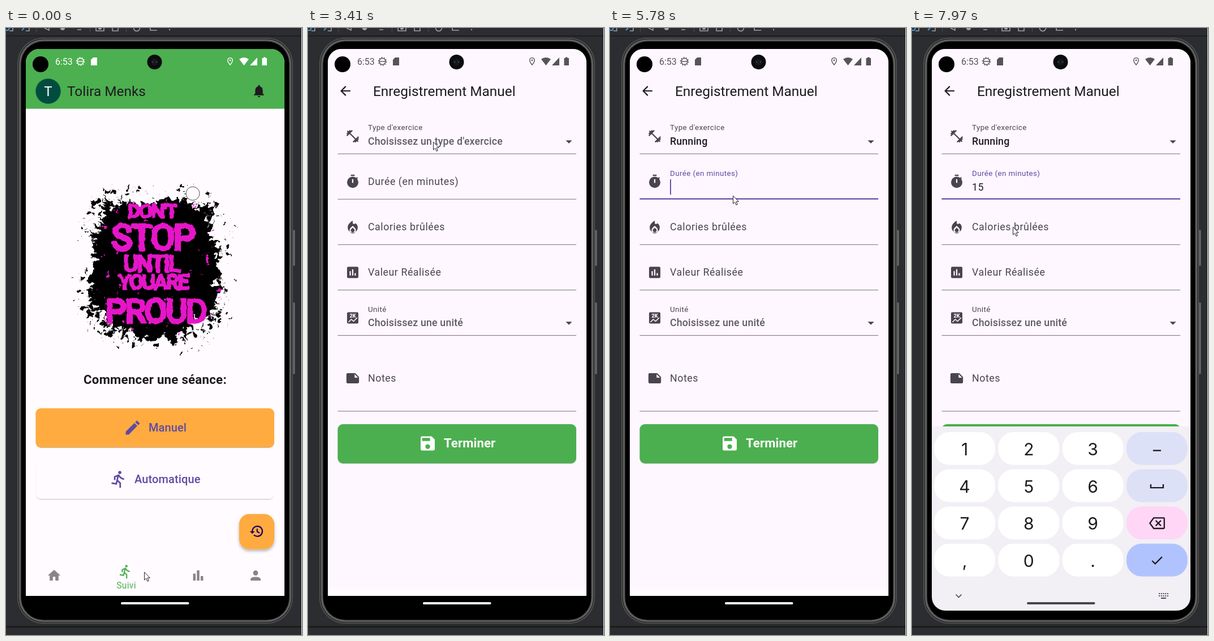
Write an HTML page that moves like this. It is 523 px wide and 1071 px high and loops after 8000 ms.

```html
<!DOCTYPE html>
<html lang="fr">
<head>
<meta charset="utf-8">
<title>Suivi</title>
<style>
  html, body { margin: 0; width: 100%; height: 100%; overflow: hidden; background: #2b2d30; }
  svg { display: block; }
  text { font-family: Roboto, sans-serif; white-space: pre; }
  .key { font-family: Inter, sans-serif; }
  .mid { text-anchor: middle; }
</style>
</head>
<body>
<svg id="stage" width="523" height="1071" viewBox="0 0 523 1071"></svg>
<script>
const LOOP = 8000;
const INK = '#1d1b20', GREY = '#49454f', HINT = '#5f5b63', PURPLE = '#5f4ba3', GREEN = '#4caf50', ORANGE = '#ffab40';
const LINE = '#827e86', PAGE = '#fef7ff', WHITE = '#fffbfe', MAGENTA = '#e616c8', NAV = '#878588';

const ring = (x, y, r) => `M${x - r} ${y}a${r} ${r} 0 1 0 ${2 * r} 0a${r} ${r} 0 1 0 ${-2 * r} 0z`;
const card = 'M3 5q0-2 2-2h14q2 0 2 2v14q0 2-2 2H5q-2 0-2-2z';

// Filled part and stroked part of each icon, on a 24 unit grid.
const ICONS = {
  edit: ['M3 17.2V21h3.800L17.800 9.900l-3.700-3.700zM15.100 5.100l3.800 3.800L21 6.700 17.300 3z'],
  run: [ring(13.5, 3.5, 2), 'M7 13V9l5-2q3 4.900 7 4.900M11.500 7.500 9 18l-6-1M10.500 13.800 14 17v6'],
  home: ['M10 20v-6h4v6h5v-8h3L12 3 2 12h3v8z'],
  bars: ['M4 9h4v11H4zM10 4h4v16h-4zM16 13h4v7h-4z'],
  person: [ring(12, 8, 4) + 'M4 20v-2c0-5 16-5 16 0v2z'],
  bell: ['M10 20h4a2 2 0 0 1-4 0M4 19v-1l2-2v-5q0-5 4.500-6.300V4a1.500 1.500 0 0 1 3 0v.7Q18 6 18 11v5l2 2v1z'],
  history: ['M1 12h8l-4 4z', 'M5 12a8 8 0 1 1 2.400 5.700M12.700 8v4.500l4 2.300'],
  back: ['', 'M20 12H5.500M12.700 4.700 5.400 12l7.300 7.300'],
  drop: ['M7 10l5 5 5-5z'],
  weights: ['', 'M3.400 3.400l17.200 17.200M2.700 11.300l8.600-8.600M2.700 8.400l5.700-5.700M12.700 21.300l8.600-8.600M15.600 21.300l5.700-5.700'],
  timer: ['M9 1h6v2H9z' + ring(12, 13, 9) + 'M11 8h2v6h-2z', 'M17 8l2.500-2.500'],
  fire: ['M12 2S4 6 4 13a8 8 0 0 0 16 0q0-5-4-7c-1 2-4 1.500-4-.7zM12 10.100l-3.500 3.400a5 5 0 1 0 7 0zM12 13l-2 2a3 3 0 1 0 4 0z'],
  chart: [card + 'M7 10h2v7H7zM11 7h2v10h-2zM15 13h2v4h-2z'],
  unit: [card],
  note: ['M22 10l-6-6H4q-2 0-2 2v12q0 2 2 2h16q2 0 2-2zM15 5.500l5.500 5.500H15z'],
  save: ['M17 3H5q-2 0-2 2v14q0 2 2 2h14q2 0 2-2V7zM5 5h10v4H5z' + ring(12, 16, 3)],
  pin: [ring(12, 9, 2), 'M12 20.500C10 18 6 13 6 9a6 6 0 0 1 12 0c0 4-4 9-6 11.500z'],
  erase: ['', 'M7 4h15q1 0 1 1v14q0 1-1 1H7L1.200 12zM10 8l8 8M18 8l-8 8'],
  check: ['', 'M4 12.700l5 4.900L20.300 6.300']
};

const icon = (name, cx, cy, size = 26.7, color = GREY) => {
  const [solid, lines = ''] = ICONS[name];
  return `<g transform="translate(${cx - size / 2} ${cy - size / 2}) scale(${size / 24})">
    <path fill="${color}" fill-rule="evenodd" d="${solid}"/>${stroke(lines, color, 2)}</g>`;
};
const text = (x, y, size, str, fill = INK, extra = '') =>
  `<text x="${x}" y="${y}" font-size="${size}" fill="${fill}" ${extra}>${str}</text>`;
const rect = (x, y, w, h, fill, r = 0, extra = '') =>
  `<rect x="${x}" y="${y}" width="${w}" height="${h}" rx="${r}" fill="${fill}" ${extra}/>`;
const circle = (x, y, r, fill, extra = '') => `<circle cx="${x}" cy="${y}" r="${r}" fill="${fill}" ${extra}/>`;
const stroke = (d, color, width = 1, extra = '') =>
  `<path d="${d}" fill="none" stroke="${color}" stroke-width="${width}" ${extra}/>`;
const spaced = (em, weight = 400) => `letter-spacing="${em}" font-weight="${weight}"`;
const button = (y, fill) => rect(52.5, y, 421.5, 69, fill, 9, 'filter="url(#low)"');

function frame() {
  const tools = '#9da0a6';
  const shell = (inset, fill) => rect(20 + inset, 17 + inset, 487 - 2 * inset, 1034 - 2 * inset, fill, 46 - inset);
  const sideKey = (y, h) => rect(504, y, 7, h, '#4a4b4d', 2) + rect(508, y + 1, 1.5, h - 2, '#77787a');
  return rect(0, 0, 523, 1071, '#2b2d30') + rect(0, 13, 523, 2, '#1e1f22')
    + stroke('M0 4h4l2-4M28 4l4-4', '#3f9be0', 2)
    + stroke('M12 0v5H6M41 0v5h-6M76 0v4l-8-4M126 3h7M159 0v5h14V0M188 0v5h10V0M255 0v4h12', tools, 1.6)
    + circle(100, 0, 4, tools) + circle(166, 0, 3, tools) + circle(231, 0, 5.5, 'none', `stroke="${tools}" stroke-width="1.6"`)
    + circle(289, 3, 1.2, tools) + [53, 148, 212].map(x => rect(x, 0, 1, 7, '#4b4e53')).join('')
    + rect(0, 1055, 523, 3, '#1b1c1e')
    + sideKey(356, 64) + sideKey(484, 127)
    + ['#505050', '#2c2c2c', '#707070', '#484848', '#000'].map((c, i) => shell(i * 1.7, c)).join('')
    + rect(522, 0, 1, 1071, '#eee');
}

function status() {
  return `<g id="status">${text(87, 65, 16, '6:53', 'currentColor')}
    ${circle(131.5, 59, 5.5, 'none', 'stroke="currentColor" stroke-width="1.400"')}
    ${circle(131.5, 59, 7, 'none', 'stroke="currentColor" stroke-width="1.500" stroke-dasharray="2 2.400"')}
    ${stroke('M126 59h11', 'currentColor', 1.4)}
    <path fill="currentColor" d="M154 52h7v14h-11V56zM412 55q8.500-6 17 0l-8.500 11zM431 66l13-14v14zM452.500 53h2.500v-1.500h3.500V53h2.500v13h-8.500z"/>
    ${icon('pin', 396, 59, 17, 'currentColor')}</g>`;
}

function poster() {
  let seed = 11;
  const rnd = () => (seed = (seed * 16807) % 2147483647) / 2147483647;
  const around = (angle, k) => {
    const bend = v => Math.sign(v) * Math.abs(v) ** .65;
    return [264 + 122 * k * bend(Math.cos(angle)), 421 + 130 * k * bend(Math.sin(angle))];
  };
  const blot = Array.from({ length: 180 }, (_, i) => {
    const a = i / 180 * Math.PI * 2;
    return around(a, .93 + .05 * Math.sin(5 * a) + .05 * Math.sin(9 * a + 2) + .16 * (rnd() - .5)).map(Math.round);
  });
  const dots = (count, from, to, size) => Array.from({ length: count }, () => {
    const [x, y] = around(rnd() * Math.PI * 2, from + rnd() * (to - from));
    return ring(x, y, .4 + size * rnd() ** 4);
  }).join('');
  const word = (str, x, y, size) => text(x, y, size, str, MAGENTA, 'letter-spacing="-.06em" word-spacing="-.2em"');
  return `<g filter="url(#torn)">
    <path d="M${blot.join('L')}z${dots(200, .9, 1.12, 6)}${dots(90, 1, 1.2, 1.5)}"/>
    <path fill="${WHITE}" d="${dots(130, .84, 1.02, 5)}"/>
    <path fill="${MAGENTA}" d="${dots(150, .4, 1, 2.6)}"/></g>
    ${circle(330, 292, 12, WHITE, 'stroke="#222" stroke-width=".8"')}
    <g class="mid" filter="url(#brush)" font-weight="500" stroke="${MAGENTA}" stroke-width="3" stroke-linejoin="round">
    ${word("DON'T", 258, 335, 34)}${word('STOP', 259, 392, 64)}${word('UNTIL', 257, 430, 40)}
    ${word('YOU ARE', 260, 461, 36)}${word('PROUD', 264, 520, 60)}</g>`;
}

function home() {
  return `<g>${rect(35, 37, 457, 965, WHITE)}${rect(35, 37, 457, 105.5, GREEN)}
    ${circle(74.5, 111.5, 22.2, '#004d40')}${text(74.5, 120, 24, 'T', '#fff', 'class="mid"')}
    ${text(108, 120, 24.4, 'Tolira Menks')}${icon('bell', 447, 111, 26.7, INK)}
    ${poster()}
    ${text(137, 628, 22.2, 'Commencer une séance:', INK, spaced(.28, 700))}
    ${button(671, ORANGE)}${icon('edit', 224, 705, 33.3, PURPLE)}${text(252, 712, 20, 'Manuel', PURPLE, spaced(.11, 500))}
    ${button(762, WHITE)}${icon('run', 199, 796, 33.3, PURPLE)}${text(227, 803, 20, 'Automatique', PURPLE, spaced(.11, 500))}
    ${rect(412, 857.5, 62, 62, ORANGE, 17.8, 'filter="url(#high)"')}${icon('history', 443, 888, 26.7, '#21005d')}
    ${icon('home', 85, 966, 26.7, NAV)}${icon('run', 211, 959, 26.7, GREEN)}
    ${icon('bars', 339.5, 966, 26.7, NAV)}${icon('person', 441, 966, 26.7, NAV)}
    ${text(212.5, 989, 15.6, 'Suivi', GREEN, 'class="mid" letter-spacing=".3"')}</g>`;
}

function form() {
  const label = (y, str, extra = '') => text(106, y, 17.78, str, GREY, `${extra} ${spaced(.55)}`);
  const small = (y, str, extra = '') => text(106, y, 13.33, str, GREY, `${extra} ${spaced(.42)}`);
  const choice = (y, str, extra = '') => text(106, y, 17.78, str, HINT, `${extra} ${spaced(.17, 500)}`);
  const rule = (y, id = '') => rect(52.5, y, 421.5, 1.1, LINE, 0, id);
  const marks = ['weights', 'timer', 'fire', 'chart', 'unit'].map((name, i) =>
    icon(name, 79, 191 + 80.1 * i) + rule(221.5 + 80.1 * i, `id="rule${i}"`)).join('');
  return `<g id="form">${rect(35, 37, 457, 952, PAGE)}${rect(35, 989, 457, 13, WHITE)}
    ${icon('back', 66, 111, 26.7, INK)}${text(115, 120, 24.4, 'Enregistrement Manuel')}
    ${marks}${text(79, 510.5, 9, '2K', PAGE, 'class="mid" font-weight="800"')}
    ${stroke('M71.500 519l5-5 4 3.500 6.500-6.500', PAGE, 1.6)}${icon('note', 79, 618)}${rule(675.5)}
    ${small(180, "Type d'exercice", 'id="typeLabel"')}${choice(206, '', 'id="typeValue"')}
    ${icon('drop', 461, 200.5)}${icon('drop', 461, 520.5)}
    ${label(277, 'Durée (en minutes)', 'id="durationIdle"')}${small(260.5, 'Durée (en minutes)', 'id="durationLabel"')}
    ${label(287, '', 'id="durationValue"')}${rect(106, 267, 1.9, 27, PURPLE, 0, 'id="caret"')}
    ${label(357, 'Calories brûlées')}${label(437, 'Valeur Réalisée')}
    ${small(500.5, 'Unité')}${choice(526, 'Choisissez une unité')}${label(624, 'Notes')}
    ${button(699, GREEN)}${icon('save', 211.5, 733, 33.3, '#fff')}
    ${text(240, 740, 22.2, 'Terminer', '#fff', spaced(.1, 700))}</g>`;
}

function menu() {
  const names = ['Running', 'Cycling', 'Swimming', 'Walking', 'Yoga', 'Other'];
  return `<g id="menu">${rect(35, 156, 457, 338, PAGE, 2, 'id="menuBox" filter="url(#high)"')}
    <g id="menuItems">${names.map((n, i) => text(53, 197 + i * 53.4, 17.78, n, INK, spaced(.17, 500))).join('')}</g></g>`;
}

function keyboard() {
  const tints = ['#dde1f7', '#dde1f7', '#ffd6f6', '#b1c3ff'];
  const signs = [(x, y) => stroke(`M${x - 7} ${y + 3}h14`, INK, 2.4), (x, y) => stroke(`M${x - 11} ${y - 3}v6h22v-6`, INK, 2.4),
    (x, y) => icon('erase', x, y, 28, INK), (x, y) => icon('check', x, y, 26, INK)];
  const keys = ['123', '456', '789', ',0.'].map((row, r) => [...row, signs[r]].map((sign, c) => {
    const x = 39 + c * 113.3, y = 713 + r * 65.6;
    return rect(x, y, 108, 58, c < 3 ? '#fff' : tints[r], 27)
      + (c < 3 ? text(x + 54, y + 41, 30, sign, INK, 'class="mid key"') : sign(x + 54, y + 29.5));
  }).join('')).join('');
  return `<g id="keyboard">${rect(35, 703, 457, 340, '#f2eff5')}${keys}
    ${stroke('M77.500 999.500l5 5 5-5', GREY, 1.6)}
    ${stroke('M436 998h17M436 1002h17', GREY, 2, 'stroke-dasharray="2 1.700"')}${stroke('M440 1006h9', GREY, 2)}</g>`;
}

const shadow = (id, dy, blur, alpha) =>
  `<filter id="${id}" x="-20%" y="-20%" width="140%" height="150%"><feDropShadow dx="0" dy="${dy}" stdDeviation="${blur}" flood-opacity="${alpha}"/></filter>`;
const ragged = (id, frequency, scale) =>
  `<filter id="${id}" color-interpolation-filters="sRGB"><feTurbulence type="fractalNoise" baseFrequency="${frequency}" numOctaves="2" seed="4"/>
  <feDisplacementMap in="SourceGraphic" scale="${scale}" xChannelSelector="R" yChannelSelector="G"/></filter>`;

document.getElementById('stage').innerHTML = `<defs>
  <clipPath id="screen"><rect x="35" y="37" width="457" height="991" rx="24"/></clipPath>
  ${ragged('torn', .12, 14)}${ragged('brush', .1, 5)}${shadow('low', 1, .7, .25)}${shadow('high', 3.5, 2.6, .28)}</defs>
  ${frame()}<g clip-path="url(#screen)">${home()}${form()}${menu()}
  ${rect(35, 1002, 457, 26, '#000')}${keyboard()}${rect(203, 1013, 120.5, 4, '#fff', 2, 'id="pill"')}${status()}</g>
  ${circle(61, 64, 14, '#000')}${circle(262.5, 60, 13, '#0b0c0e')}${circle(262.5, 60, 6, '#15181c')}
  ${circle(259, 60, 1.3, '#39434c')}${circle(266, 60, 1.3, '#39434c')}
  <path id="pointer" d="M.5 0v14l3.200-3 2.300 5.300 2.300-1-2.300-5.100h4.300z" fill="#fff" stroke="#222"/>`;

// The pointer follows a bent path in a number of even jumps.
const MOVES = [
  { start: 120, end: 780, jumps: 6, via: [350, 745], to: [317, 697] },
  { start: 2420, end: 3410, jumps: 8, via: [240, 120], to: [221, 201] },
  { start: 3680, end: 4370, jumps: 6, via: [165, 235], to: [91, 186] },
  { start: 4890, end: 5350, jumps: 4, via: [130, 240], to: [217, 296] },
  { start: 7550, end: 7970, jumps: 4, via: [193, 332], to: [178, 351] }
];

const phase = (t, from, to) => Math.min(1, Math.max(0, (t - from) / (to - from)));
const mix = (a, b, k) => a + (b - a) * k;
const tone = g => `rgb(${g},${g},${g})`;

function pointerAt(t) {
  let place = [244, 960];
  for (const { start, end, jumps, via, to } of MOVES) {
    if (t < start) break;
    const k = (Math.floor(phase(t, start, end) * (jumps - 1) + .01) + 1) / jumps;
    const ease = k * k * (3 - 2 * k);
    place = place.map((p, i) => mix(mix(p, via[i], ease), mix(via[i], to[i], ease), ease));
  }
  return place;
}

const ui = Object.fromEntries([...document.querySelectorAll('#stage [id]')].map(el => [el.id, el]));
const set = (id, attrs) => Object.entries(attrs).forEach(([k, v]) => ui[id].setAttribute(k, v));
const underline = (id, bottom, focused) =>
  set(id, { y: bottom - (focused ? 2.2 : 1.1), height: focused ? 2.2 : 1.1, fill: focused ? PURPLE : LINE });

function render(t) {
  const chosen = t >= 4740, typing = t >= 5780, closing = chosen && t < 4890;
  const typed = '15'.slice(0, (t >= 6860) + (t >= 7160));
  const lastKey = [5780, 6860, 7160][typed.length];
  const enter = phase(t, 1290, 1440);

  set('pointer', { transform: `translate(${pointerAt(t)})` });
  set('form', { opacity: enter, transform: `translate(263.5 520) scale(${mix(.92, 1, enter)}) translate(-263.5 -520)` });
  set('status', { color: tone(mix(255, 85, phase(t, 1460, 1730))) });

  set('menu', { opacity: closing ? .14 : t >= 3530 && !chosen ? 1 : 0 });
  set('menuBox', { height: mix(120, 338, phase(t, 3530, 3680)) });
  set('menuItems', { opacity: phase(t, 3600, 3800) });

  set('typeLabel', { fill: chosen && !typing ? PURPLE : GREY });
  set('typeValue', { fill: chosen ? INK : HINT });
  ui.typeValue.textContent = chosen ? 'Running' : "Choisissez un type d'exercice";
  underline('rule0', 222.6, chosen && !typing);

  set('durationIdle', { opacity: typing ? 0 : 1 });
  set('durationLabel', { opacity: typing ? 1 : 0, fill: PURPLE });
  set('durationValue', { fill: INK });
  ui.durationValue.textContent = typed;
  underline('rule1', 302.6, typing);
  set('caret', { x: 106 + 10.5 * typed.length, opacity: typing && (t - lastKey) % 1000 < 500 ? 1 : 0 });

  set('keyboard', { transform: `translate(0 ${340 * (1 - phase(t, 5850, 6350)) ** 8})` });
  set('pill', { fill: t < 5850 ? '#fff' : tone(mix(230, 72, phase(t, 6200, 7550))) });
}

const start = performance.now();
function tick() {
  render((performance.now() - start) % LOOP);
  requestAnimationFrame(tick);
}
tick();
</script>
</body>
</html>
```
